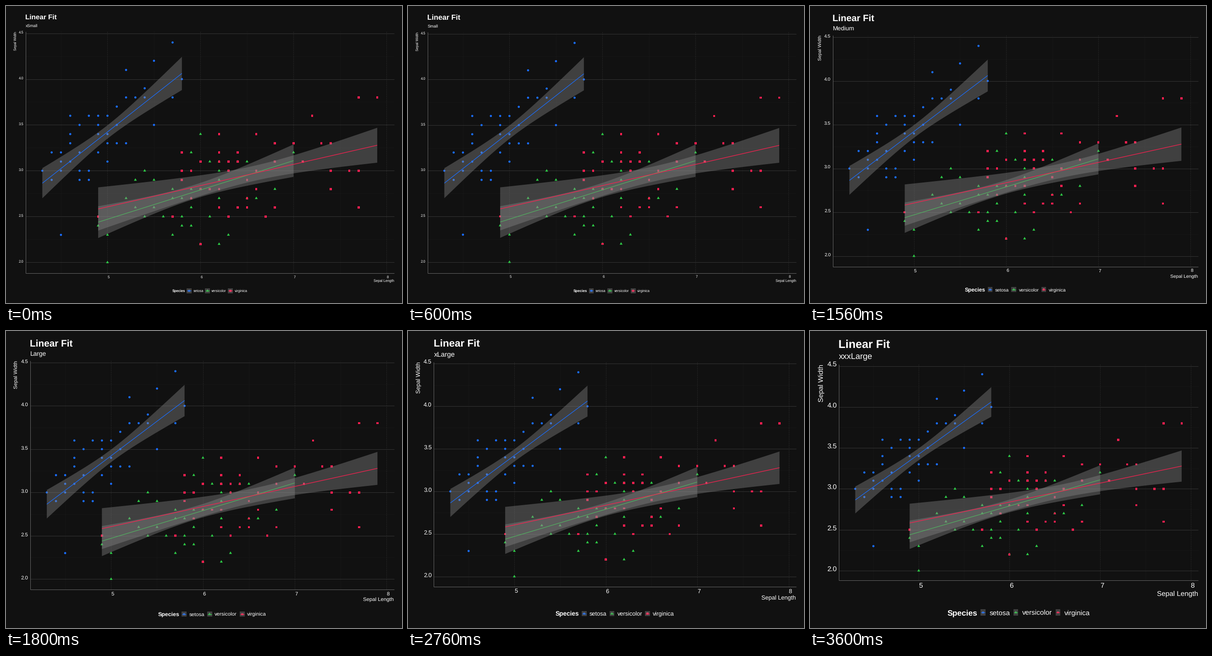
A matplotlib script for the animation above (4200 ms loop, 864 by 648 pixels).

```python
import numpy as np
import matplotlib.pyplot as plt
from matplotlib.animation import FuncAnimation
from matplotlib.collections import PolyCollection
from matplotlib.patches import Rectangle
from matplotlib.textpath import TextPath

plt.rcParams["font.family"] = "Liberation Sans"
plt.rcParams["text.hinting"] = "none"

W, H = 864, 648
RIGHT = 846
BACK = "#111111"
X_MIN, X_MAX, Y_MIN, Y_MAX = 4.12, 8.08, 1.88, 4.52
BAND = dict(facecolor="#888888", alpha=0.4, linewidth=0, zorder=3)
KEY = 10.8          # legend key width
COUNT = 50          # flowers per species
T_VALUE = 2.0106    # 95 % interval with 48 degrees of freedom

rng = np.random.default_rng(7)


def ngon(n, radius, start):
    a = np.radians(start) + np.arange(n) * 2 * np.pi / n
    return radius * np.column_stack([np.cos(a), np.sin(a)])


class Species:
    """A regression line, a seeded cloud around it and a few outlying points."""

    def __init__(self, name, color, shape, slope, start, mean, sxx, error, outer):
        self.name, self.color, self.shape = name, color, shape
        self.slope, self.start = slope, start
        self.mean, self.sxx, self.error = mean, sxx, error
        self.points = sorted(set(outer) | self.cloud(36))

    def fit(self, x):
        return self.start + self.slope * x

    def cloud(self, n):
        spread = np.sqrt(self.sxx / (COUNT - 1))
        x = np.round(self.mean + spread * np.clip(rng.normal(0, 0.9, n), -1.3, 1.3), 1)
        noise = self.error * np.clip(rng.normal(0, 0.9, n), -1.3, 1.3)
        return set(zip(x, np.round(self.fit(x) + noise, 1)))

    def interval(self):
        x = np.linspace(self.points[0][0], self.points[-1][0], 80)
        half = T_VALUE * self.error * np.sqrt(1 / COUNT + (x - self.mean) ** 2 / self.sxx)
        return x, self.fit(x), half


SPECIES = [
    Species("setosa", "#1a6eff", ngon(28, 2.35, 0),
            0.7985, -0.5694, 5.006, 6.088, 0.2565,
            [(4.3, 3.0), (4.4, 3.2), (4.4, 2.9), (4.5, 2.3), (4.6, 3.6), (5.2, 4.1),
             (5.4, 3.9), (5.5, 4.2), (5.5, 3.5), (5.7, 4.4), (5.7, 3.8), (5.8, 4.0)]),
    Species("versicolor", "#2ecc47", ngon(3, 3.6, -90),
            0.3197, 0.8721, 5.936, 13.055, 0.2697,
            [(4.9, 2.4), (5.0, 2.0), (5.0, 2.3), (5.2, 2.7), (5.4, 3.0), (5.9, 3.2),
             (6.0, 3.4), (6.0, 2.2), (6.2, 2.2), (6.3, 2.3), (6.8, 2.8), (7.0, 3.2)]),
    Species("virginica", "#ff1f50", ngon(4, 3.25, 45),
            0.2319, 1.4463, 6.588, 19.813, 0.2898,
            [(4.9, 2.5), (5.7, 2.5), (6.0, 2.2), (6.2, 3.4), (6.7, 2.5), (7.2, 3.6),
             (7.4, 2.8), (7.6, 3.0), (7.7, 3.8), (7.7, 3.0), (7.7, 2.6), (7.9, 3.8)]),
]

# Type scale: subtitle, then sizes of title, subtitle, legend title and body
SCALES = [
    ("xSmall", 15.3, 8.8, 7.5, 7.6),
    ("Small", 16, 9.3, 8, 7.6),
    ("Medium", 20.2, 13.3, 11.9, 10.2),
    ("Large", 20.7, 13.8, 12.4, 11.4),
    ("xLarge", 22.4, 15, 13.6, 12.7),
    ("xxLarge", 23.8, 16.3, 14.8, 14),
    ("xxxLarge", 25, 18.1, 17.4, 15.2),
]

# 72 dpi makes one point equal one pixel
fig = plt.figure(figsize=(W / 72, H / 72), dpi=72, facecolor=BACK)
ax = fig.add_axes([0, 0, 1, 1])


def label(x, y, text, size, **style):
    ax.text(x, y, text, fontsize=size, color="white", va="baseline", **style)


def text_width(text, size, weight="normal"):
    return TextPath((0, 0), text, size=size, prop={"weight": weight}).get_extents().width


def segment(x0, y0, x1, y1, color, width=1.0, **style):
    ax.plot([x0, x1], [y0, y1], color=color, lw=width,
            solid_capstyle="butt", dash_capstyle="butt", **style)


def markers(species, centres):
    verts = np.asarray(centres)[:, None, :] + species.shape
    ax.add_collection(PolyCollection(verts, facecolors=species.color, linewidths=0, zorder=2))


def draw_grid(left, top, bottom, px, py):
    dots, dashes = (0, (1, 2)), (0, (2, 2))
    for v in np.arange(2.25, 4.5, 0.5):
        segment(left, py(v), RIGHT, py(v), "#1f1f1f", linestyle=dots)
    for v in np.arange(4.5, 8, 1):
        segment(px(v), top, px(v), bottom, "#1f1f1f", linestyle=dots)
    for v in np.arange(2, 4.6, 0.5):
        segment(left, py(v), RIGHT, py(v), "#343434")
    for v in range(5, 9):
        segment(px(v), top, px(v), bottom, "#2b2b2b", linestyle=dashes)


def draw_data(px, py):
    for s in SPECIES:
        markers(s, [(px(x), py(y)) for x, y in s.points])
    for s in SPECIES:
        x, y, half = s.interval()
        ax.fill_between(px(x), py(y - half), py(y + half), **BAND)
        ax.plot(px(x), py(y), color=s.color, lw=1.25, zorder=3, solid_capstyle="butt")


def draw_axes(left, top, bottom, size, px, py):
    segment(left, top, left, bottom, "#666666", zorder=4)
    segment(left, bottom, RIGHT, bottom, "#666666", zorder=4)
    for v in range(5, 9):
        label(px(v), bottom + 5 + 0.72 * size, str(v), size)
    for v in np.arange(2, 4.6, 0.5):
        label(left - 4.5, py(v) + 0.8, f"{v:.1f}", size, ha="right")
    label(RIGHT, bottom + 5.2 + 1.85 * size, "Sepal Length", size, ha="right")
    label(17.3 + 0.73 * size, top, "Sepal Width", size, ha="right",
          rotation=90, rotation_mode="anchor")


def draw_legend(middle, cy, title_size, size):
    gap = 0.47 * title_size
    title_width = text_width("Species", title_size, "bold")
    widths = [text_width(s.name, size) for s in SPECIES]
    total = title_width + sum(widths) + len(SPECIES) * (KEY + 2 * gap)
    tall = max(KEY, 0.9 * size)

    x = middle - total / 2
    label(x, cy + 0.36 * title_size, "Species", title_size, weight="bold")
    x += title_width + gap
    for s, width in zip(SPECIES, widths):
        markers(s, [(x + KEY / 2, cy)])
        ax.add_patch(Rectangle((x, cy - tall / 2), KEY, tall, **BAND))
        segment(x + 0.1 * KEY, cy, x + 0.9 * KEY, cy, s.color, 1.25, zorder=3)
        label(x + KEY + gap, cy + 0.36 * size, s.name, size)
        x += KEY + width + 2 * gap


def draw(i):
    subtitle, title_size, sub_size, legend_size, size = SCALES[i]

    # Larger type pushes the panel's edges inward
    left = 21.9 + 2.68 * size
    top = 33 + 0.915 * (title_size + sub_size)
    bottom = 618.4 - 3.3 * size - 1.4 * legend_size

    def px(v):
        return left + (v - X_MIN) / (X_MAX - X_MIN) * (RIGHT - left)

    def py(v):
        return bottom - (v - Y_MIN) / (Y_MAX - Y_MIN) * (bottom - top)

    ax.clear()
    # Whole numbers fall on pixel centres
    ax.set(xlim=(-0.5, W - 0.5), ylim=(H - 0.5, -0.5))
    ax.axis("off")

    draw_grid(left, top, bottom, px, py)
    draw_data(px, py)
    draw_axes(left, top, bottom, size, px, py)
    label(left - 0.8, 18 + 0.727 * title_size, "Linear Fit", title_size, weight="bold")
    label(left, top - 8 - 0.23 * sub_size, subtitle, sub_size)
    draw_legend((left + RIGHT) / 2, 627.8 - 0.7 * size - 0.2 * legend_size,
                legend_size, size)
    return []


anim = FuncAnimation(fig, draw, frames=len(SCALES), init_func=lambda: draw(0),
                     interval=600, repeat=True)
plt.show()
```
